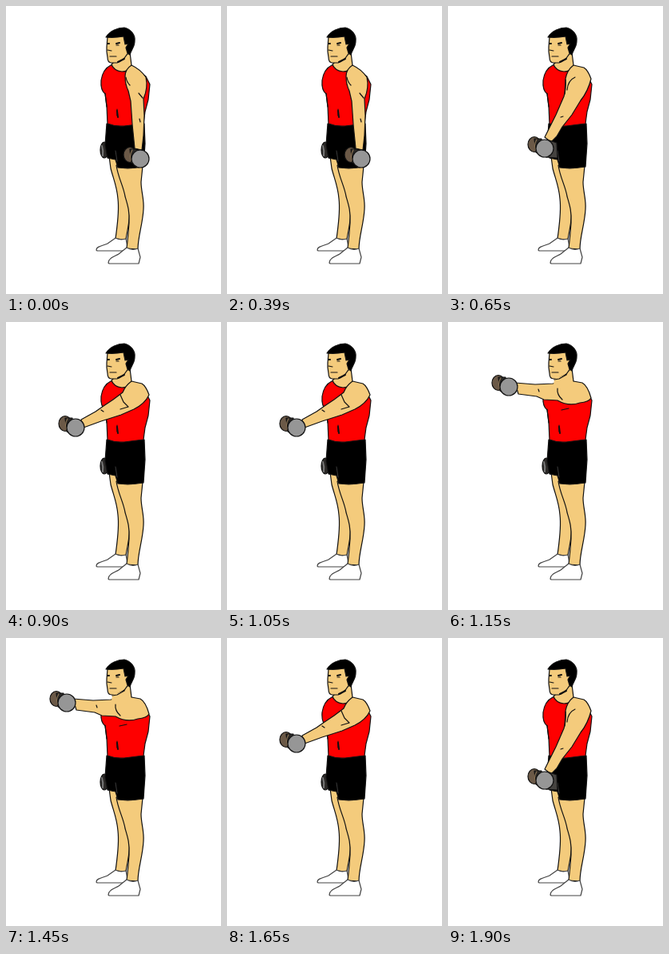
These frames come from a looping animation (269 by 360 pixels, 2150 ms). An HTML page:

```html
<!DOCTYPE html>
<html lang="en">
<head>
<meta charset="utf-8">
<title>Dumbbell front raise</title>
<style>
  html, body { margin: 0; width: 100%; height: 100%; overflow: hidden; background: #fff; }
  svg { display: block; width: 100vw; height: 100vh; }
  path, circle, ellipse { stroke: #111; stroke-width: 1.2; stroke-linejoin: round; stroke-linecap: round; }
  .skin { fill: #f4cb7c; }
  .red { fill: #fe0000; }
  .shoe { fill: #fff; stroke: #444; }
  .line { fill: none; }
  .bold { fill: none; stroke-width: 2; }
  .plate { fill: #969696; }
  .dark { fill: #2b2927; }
  .brown { fill: #6b5947; }
  .bare { stroke: none; }
</style>
</head>
<body>
<svg viewBox="0 0 269 360">
  <defs>
    <g id="dumbbell">
      <ellipse class="brown" cx="-13" cy="-5" rx="8" ry="9.5"/>
      <path class="dark" d="M-13-12 L-4-12 L-4 8 L-11 5Z"/>
      <path class="line" d="M-10-11 Q-15-3 -10 4" style="stroke:#8b7354"/>
      <circle class="plate" r="11"/>
    </g>
  </defs>

  <!-- legs and shoes -->
  <path class="skin" d="M129 188 L131 203 C134 215 139 226 140 241 C142 258 139 275 137 291 L150 292 C152 278 156 267 154 253 L145 190Z"/>
  <path class="shoe" d="M113 305 C113 300 121 300 127 297 L137 290 Q143 293 150 291 L152 301 L148 306 L114 306Z"/>
  <path class="skin" d="M138 199 C140 214 147 225 149 238 C152 248 155 257 154 271 C153 285 152 294 151 303 L165 304 C165 288 171 273 172 254 C173 241 169 232 169 220 L171 200Z"/>
  <path class="shoe" d="M128 321 C128 315 136 313 141 310 L151 302 Q158 306 165 303 L168 314 L166 322 L129 322Z"/>

  <g data-poses="0 2 3">
    <ellipse class="dark" cx="123" cy="180" rx="5" ry="10"/>
    <path class="line" d="M120 175 Q122 181 121 187" style="stroke:#777;stroke-width:2"/>
  </g>

  <!-- shorts, vest, neck -->
  <path d="M126 147 L173 147 L174 172 L172 201 Q155 204 140 202 L137 192 L127 190 L124 174Z"/>
  <path class="line" d="M137 181 L139 194" style="stroke:#555;stroke-width:.7"/>
  <path class="red" d="M131 74 Q121 79 119 93 Q118 105 124 110 L126 125 L127 147 Q137 151 148 150 L172 147 L174 132 L178 117 L180 98 L175 88 L157 75Z"/>
  <path class="line" d="M124 109 L126 126 M139 129 L139 137"/>
  <path class="bold" d="M139 131 L140 139"/>
  <path class="skin" d="M132 73 Q135 81 145 82 Q152 82 156 78 L157 74 L155 58 L139 66Z"/>

  <!-- head -->
  <path class="skin" d="M127 39 L126 51 L126 57 L127 64 Q127 71 132 71 L139 71 Q147 68 151 61 L155 57 L153 37Z"/>
  <path d="M125 39 C130 31 140 27 148 27 C157 29 162 37 161 44 C161 51 157 54 155 61 L152 59 L150 52 L153 47 L149 48 L147 38 Q136 40 125 39Z"/>
  <path class="bold" d="M127 47 L129 47 M138 47 L142 46 M140 70 L148 66"/>
  <path class="line" d="M127 55 L132 56 M130 63 L138 63 M138 49 L141 49"/>

  <!-- arm poses -->
  <g data-poses="0">
    <path class="skin" d="M157 74 Q149 79 149 88 Q149 98 153 106 L156 119 L158 148 L161 178 L170 180 L172 162 L173 137 L172 116 Q178 102 175 89 Q168 79 157 74Z"/>
    <path class="line" d="M150 89 Q151 95 155 99 M166 109 L171 115 M167 141 L168 145"/>
    <use href="#dumbbell" x="168" y="191"/>
  </g>

  <g data-poses="1">
    <path class="skin" d="M157 74 Q149 80 147 91 Q148 103 145 113 L135 136 L128 150 L121 164 L129 170 L136 163 L143 151 L155 136 L166 118 Q175 107 179 91 Q175 80 170 77Z"/>
    <path class="line" d="M147 92 L146 110 M141 139 L144 138 M159 89 Q150 93 149 105"/>
    <path d="M127 168 L136 171 L137 190 L123 189Z" style="fill:#454340"/>
    <use href="#dumbbell" x="121" y="178"/>
  </g>

  <g data-poses="2">
    <path class="skin" d="M157 74 Q149 80 146 88 L134 97 L122 105 L112 112 L94 122 L97 132 L119 124 L144 116 L160 109 Q174 102 179 91 Q175 80 170 77Z"/>
    <path class="line" d="M143 91 L147 100 L153 106 M143 109 L153 106 M119 110 L122 112"/>
    <use href="#dumbbell" x="87" y="132"/>
  </g>

  <g data-poses="3">
    <path class="bare" d="M116 70 L134 72 L134 97 L117 97Z" style="fill:#fff"/>
    <path class="skin" d="M157 74 L139 76 L131 77 L109 78 L84 76 L88 90 L111 93 L120 97 L137 98 Q151 106 165 101 Q176 100 179 95 Q175 80 168 76Z"/>
    <path class="skin bare" d="M133 71 L151 65 L157 75 L147 83 L132 79Z"/>
    <path class="line" d="M133 72 L139 71 L148 66 M137 83 Q136 91 143 97 M113 84 L114 87 M142 110 L151 108"/>
    <use href="#dumbbell" x="76" y="81"/>
  </g>
</svg>
<script>
  // Each step: the moment it ends (ms) and the arm pose it holds.
  const steps = [[650, 0], [900, 1], [1150, 2], [1650, 3], [1900, 2], [2150, 1]];
  const loop = 2150;
  const parts = [...document.querySelectorAll('[data-poses]')];
  const start = performance.now();

  function draw() {
    const time = (performance.now() - start) % loop;
    const pose = String(steps.find(([end]) => time < end)[1]);
    for (const part of parts) {
      part.style.display = part.dataset.poses.split(' ').includes(pose) ? '' : 'none';
    }
    requestAnimationFrame(draw);
  }
  draw();
</script>
</body>
</html>
```
